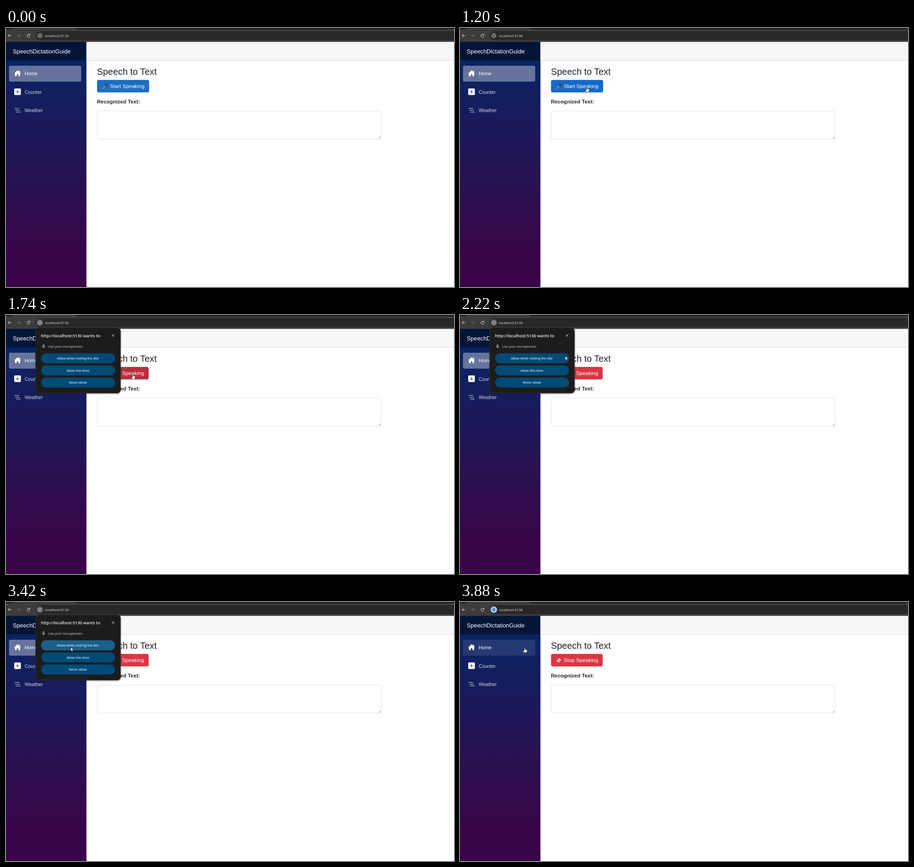
Write an HTML page that moves like this. It is 983 px wide and 570 px high and loops after 8 s.

```html
<!DOCTYPE html>
<html lang="en">
<head>
<meta charset="utf-8">
<title>Speech to Text</title>
<style>
html, body { margin: 0; width: 100%; height: 100%; overflow: hidden; background: #fff; }
svg { display: block; font-family: "Liberation Sans", Arial, sans-serif; }
.ui { font-family: "Open Sans", "Noto Sans", sans-serif; }
.line { fill: none; stroke: currentColor; stroke-linecap: round; stroke-linejoin: round; }
.nav { font-size: 10.5px; fill: #d7d7d7; }
.choice { font-size: 7px; font-weight: 600; fill: #c2e7ff; text-anchor: middle; }
</style>
</head>
<body>
<svg width="983" height="570" viewBox="0 0 983 570">
  <defs>
    <linearGradient id="side" gradientUnits="userSpaceOnUse" x1="0" y1="30" x2="0" y2="500">
      <stop stop-color="#052767"/><stop offset="1" stop-color="#3a0647"/>
    </linearGradient>
    <filter id="shadow" x="-10%" y="-10%" width="120%" height="120%">
      <feDropShadow dx="0" dy="1" stdDeviation="1.5" flood-opacity=".5"/>
    </filter>
    <g id="mic" class="line">
      <rect x="-1.3" y="-4" width="2.6" height="4.8" rx="1.3"/>
      <path d="M-2.8 -.6Q-2.8 2.3 0 2.3T2.8 -.6M0 2.3V4"/>
    </g>
  </defs>

  <!-- browser bar -->
  <rect width="983" height="31" fill="#3c3c3c"/>
  <path d="M0 0H16Q15 3 12 3H0ZM154 0H983V3H158Q155 3 154 0Z" fill="#202020"/>
  <rect x="65" y="7" width="940" height="19.5" rx="9.7" fill="#282828"/>
  <g class="line" color="#dedede">
    <path d="M11.2 16.7H4.8M7.7 13.7L4.7 16.7L7.7 19.7"/>
    <path d="M25 16.7H31.4M28.5 13.7L31.5 16.7L28.5 19.7" stroke="#7d7d7d"/>
    <path d="M52 15A3.3 3.3 0 1 0 52.5 17.8M52.6 13.2V15.4H50.3"/>
  </g>
  <circle id="badge" cx="74.2" cy="16.8" r="7.2"/>
  <g id="info" class="line" color="#e3e3e3" stroke-width=".9">
    <circle cx="74.2" cy="16.8" r="3.7"/><path d="M74.2 16.5V18.6M74.2 14.8V14.9"/>
  </g>
  <use id="micOn" href="#mic" x="74.2" y="16.8" color="#0b4a8f"/>
  <text class="ui" x="85.7" y="19.6" font-size="7.7" fill="#e6e6e6">localhost:5130</text>

  <!-- sidebar -->
  <rect y="30.5" width="176.5" height="540" fill="url(#side)"/>
  <rect y="30.5" width="176.5" height="40.7" fill="#000" fill-opacity=".45"/>
  <text x="15" y="55.8" font-size="12.75" fill="#fff">SpeechDictationGuide</text>
  <rect id="home" x="6.5" y="83" width="158.5" height="35" rx="3" fill="#fff"/>
  <path d="M18.3 99.7L25.3 93L28.6 96.1V94H30.6V98L32.3 99.7L31 100.6V106H27.3V101.7H23.4V106H19.7V100.6Z" fill="#fff"/>
  <rect x="18" y="133" width="14.6" height="14.6" rx="1.8" fill="#fff"/>
  <path d="M25.3 136.8V143.8M21.8 140.3H28.8" stroke="#12205f" stroke-width="1"/>
  <path class="line" color="#e2e2e8" stroke-width="1.2" d="M19.2 177H28.2M21 181H30.2M22.8 185H31.8"/>
  <g class="nav">
    <text x="41" y="104" style="fill:#fff">Home</text>
    <text x="41" y="144.7">Counter</text>
    <text x="41" y="185.3">Weather</text>
  </g>

  <!-- page -->
  <rect x="176.5" y="30.5" width="807" height="40.5" fill="#f7f7f7"/>
  <path d="M176.5 71.3H983" stroke="#d6d5d5"/>
  <g fill="#212529">
    <text x="199.5" y="103.3" font-size="19.9">Speech to Text</text>
    <text x="199.5" y="166" font-size="11.5" font-weight="700">Recognized Text:</text>
  </g>
  <rect id="button" x="199.7" y="114.3" height="27.5" rx="4"/>
  <g id="micIcon">
    <path d="M211.7 133.5L218.5 126.6" stroke="#8d8f9c" stroke-width="2.2" stroke-linecap="round"/>
    <path d="M216 126L219.3 129.2" stroke="#c06a78" stroke-width="1.2"/>
    <circle cx="219.8" cy="125.3" r="2.9" fill="#40414e"/>
  </g>
  <g id="stopIcon">
    <circle cx="216.8" cy="128.3" r="4.6" fill="#f7e9eb" stroke="#cf4553" stroke-width="1"/>
    <path d="M213.6 125.1L220 131.5" stroke="#cf3444" stroke-width="1.7"/>
  </g>
  <text id="label" x="227.8" y="132.4" font-size="11.6" fill="#fff"></text>
  <rect x="199.9" y="182.6" width="623" height="62" rx="4" fill="#fff" stroke="#dee2e6"/>
  <path d="M817.5 243.3L822 238.8M820.2 243.3L822 241.5" stroke="#777" stroke-width=".8"/>

  <!-- permission prompt -->
  <g id="prompt" class="ui">
    <rect x="65" y="28" width="186.3" height="144" rx="7" fill="#1f1f1f" stroke="#3b3b3b" stroke-width=".7" filter="url(#shadow)"/>
    <text x="76.7" y="49.2" font-size="9" font-weight="600" fill="#f0f0f0">http://localhost:5130 wants to</text>
    <path d="M232.2 42.5L237.6 47.9M237.6 42.5L232.2 47.9" stroke="#dedede"/>
    <use href="#mic" x="82.5" y="69" color="#d0d0d0" stroke-width=".9"/>
    <text x="92.8" y="72" font-size="7.1" fill="#d5d5d5">Use your microphones</text>
    <g fill="#004a77">
      <rect id="allow" x="77" y="84.2" width="162.3" height="22.2" rx="11.1"/>
      <rect x="77" y="110.9" width="162.3" height="22.2" rx="11.1"/>
      <rect x="77" y="137.6" width="162.3" height="22.2" rx="11.1"/>
    </g>
    <g class="choice">
      <text x="157.7" y="98">Allow while visiting the site</text>
      <text x="157.7" y="124.7">Allow this time</text>
      <text x="157.7" y="151.4">Never allow</text>
    </g>
  </g>

  <g id="pointer" stroke="#000" stroke-width=".7" stroke-linejoin="round" fill="#fff">
    <path id="arrow" d="M0 0V8.9L2 7.1L3.4 10.3L4.9 9.6L3.5 6.5H6.3Z"/>
    <path id="hand" d="M-1 .8Q0 -.6 1 .8V4.6L4.2 5.4Q5.6 5.8 5.4 7.6L4.3 12.2H-1.2L-4 8.4Q-4.3 6.6 -2.8 7L-1 8.4Z"/>
  </g>
</svg>
<script>
const LOOP = 8000;
const $ = id => document.getElementById(id);
const show = (id, on) => $(id).style.display = on ? '' : 'none';
const ramp = (t, a, b) => Math.min(1, Math.max(0, (t - a) / (b - a)));
const blend = (from, to, p) => `rgb(${from.map((v, i) => Math.round(v + (to[i] - v) * p))})`;

const BLUE = [27, 110, 194], BLUE_HOVER = [11, 94, 215];
const RED = [220, 53, 69], RED_HOVER = [187, 45, 59];

// time, x, y of the pointer's hot spot
const path = [
  [390, 912, 558], [510, 800, 494], [640, 610, 376], [770, 450, 284],
  [890, 370, 236], [1010, 304, 176], [1140, 275, 143], [1200, 278.4, 129],
  [1950, 278.4, 129], [2120, 258, 112], [2270, 218, 80], [2420, 172, 59],
  [2560, 150, 72], [2740, 142, 99.6]
];

function pointerAt(t) {
  const i = path.findIndex(k => k[0] > t);
  if (i < 0) return path[path.length - 1].slice(1);
  const a = path[i - 1], b = path[i], p = ramp(t, a[0], b[0]);
  return [a[1] + (b[1] - a[1]) * p, a[2] + (b[2] - a[2]) * p];
}

function buttonColor(t) {
  if (t < 1400) return blend(BLUE, BLUE_HOVER, ramp(t, 1150, 1300));
  if (t < 2080) return blend(BLUE_HOVER, RED_HOVER, ramp(t, 1400, 1550));
  return blend(RED_HOVER, RED, ramp(t, 2080, 2230));
}

function draw(t) {
  const listening = t >= 1400, granted = t >= 3490, homeHover = t >= 3800;

  $('button').setAttribute('width', listening ? 113.3 : 114.3);
  $('button').setAttribute('fill', buttonColor(t));
  $('label').textContent = listening ? 'Stop Speaking' : 'Start Speaking';
  show('micIcon', !listening);
  show('stopIcon', listening);

  $('badge').setAttribute('fill', granted ? '#a8c7fa' : t >= 1690 ? '#5c5c5c' : '#3c3c3c');
  show('info', !granted);
  show('micOn', granted);
  $('home').setAttribute('fill-opacity', homeHover ? .1 : .37);

  const open = ramp(t, 1545, 1690) * (1 - ramp(t, 3480, 3635));
  const scale = 1 - .065 * (1 - open);
  show('prompt', open > 0);
  $('prompt').setAttribute('opacity', open);
  $('prompt').setAttribute('transform', `translate(158 100) scale(${scale}) translate(-158 -100)`);
  $('allow').setAttribute('fill', blend([0, 74, 119], [30, 95, 138], ramp(t, 2600, 2700)));

  const hand = t >= 1180 && t < 2080 || homeHover;
  show('pointer', t >= 390);
  show('hand', hand);
  show('arrow', !hand);
  if (t >= 390) $('pointer').setAttribute('transform', `translate(${pointerAt(t)})`);
}

const start = performance.now();
function tick() {
  draw((performance.now() - start) % LOOP);
  requestAnimationFrame(tick);
}
tick();
</script>
</body>
</html>
```
